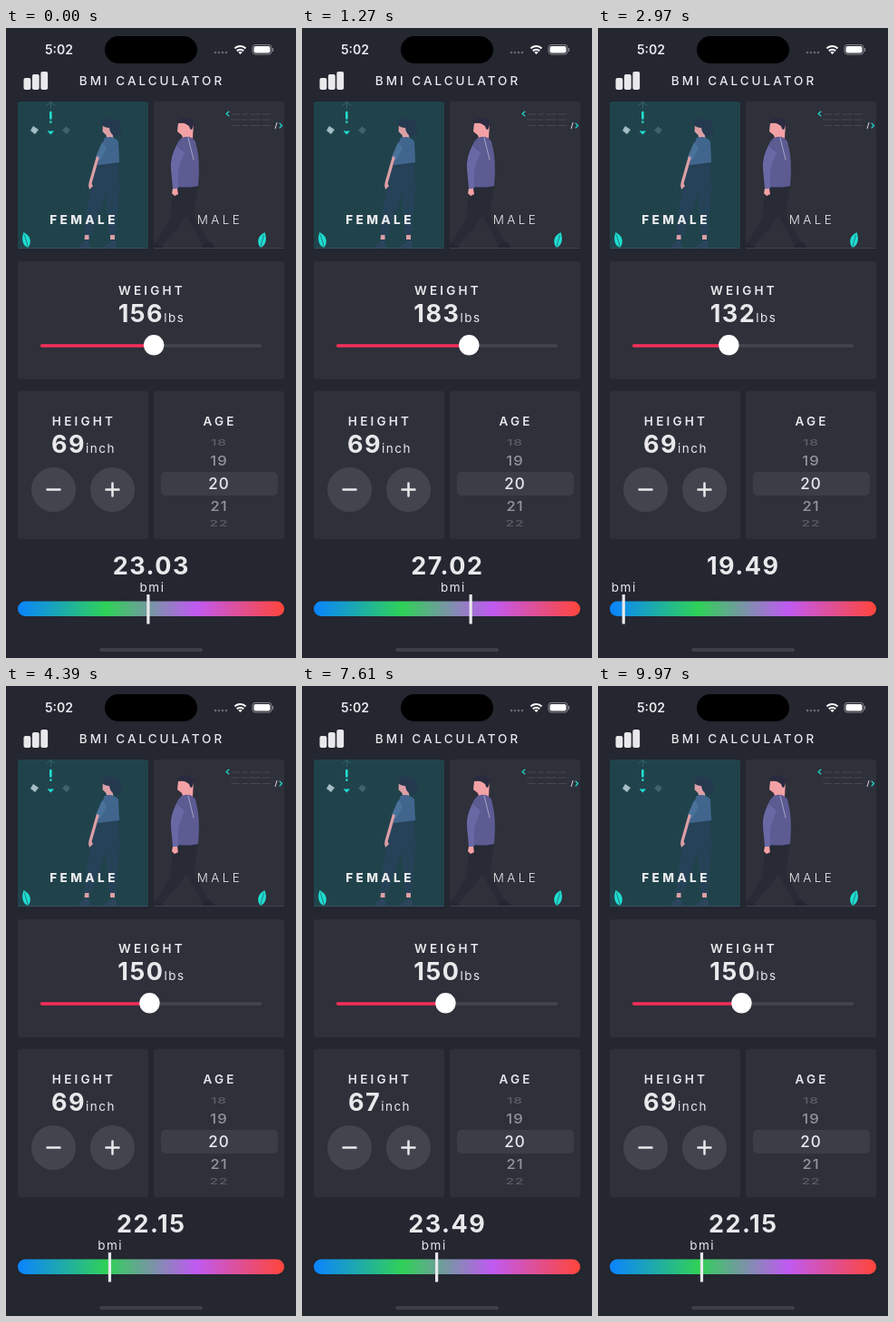
Recreate the animation shown at these times as an HTML page. Size 320 px wide and 694 px high, loop 10000 ms.

```html
<!DOCTYPE html>
<html lang="en">
<head>
<meta charset="utf-8">
<title>BMI Calculator</title>
<style>
  html, body { margin: 0; width: 100%; height: 100%; overflow: hidden; background: #242630; }
  svg { display: block; width: 320px; height: 694px; }
  text { font: 400 13.5px Inter, sans-serif; fill: #e9e9ec; text-anchor: middle; }
  .title { font-weight: 500; letter-spacing: 3px; }
  .head { font-weight: 600; letter-spacing: 3.2px; }
  .gender { letter-spacing: 3.4px; }
  .value { font-size: 27px; font-weight: 700; letter-spacing: 1.5px; }
  .unit { font-size: 13.5px; font-weight: 400; letter-spacing: 1.5px; }
  .age { font-size: 17px; font-weight: 500; letter-spacing: 1px; }
  .card { fill: #2e303a; }
  .line { fill: none; stroke-linecap: round; stroke-linejoin: round; }
</style>
</head>
<body>
<svg viewBox="0 0 320 694">
  <defs>
    <linearGradient id="scale">
      <stop stop-color="#0a84ff"/>
      <stop offset=".333" stop-color="#30d158"/>
      <stop offset=".667" stop-color="#bf5af2"/>
      <stop offset="1" stop-color="#ff453a"/>
    </linearGradient>
    <g id="leaf">
      <path d="M-3-9C5-5 6 2 2 8C-4 6-6-1-3-9Z" fill="#1fddd0"/>
      <path d="M-2-6L2 8" class="line" stroke="#20545c" stroke-width=".7"/>
    </g>
  </defs>
  <rect width="320" height="694" fill="#242630"/>

  <!-- Status bar -->
  <text x="58.500" y="28.500" style="font-size:14px;font-weight:600">5:02</text>
  <rect x="109" y="9" width="102" height="30" rx="15"/>
  <path d="M231 27h14" class="line" stroke="#686a72" stroke-width="2.600" stroke-dasharray="0 4"/>
  <g class="line" stroke="#fff" stroke-width="2" style="stroke-linecap:butt">
    <path d="M252.500 22.500a8.300 8.300 0 0 1 12 0M254.800 25.200a5.200 5.200 0 0 1 7.400 0"/>
  </g>
  <path d="M258.500 29l-2.200-2.300a3.200 3.200 0 0 1 4.400 0Z" fill="#fff"/>
  <rect x="272" y="18.500" width="21" height="10.500" rx="3" fill="none" stroke="#85868d"/>
  <rect x="273.500" y="20" width="18" height="7.500" rx="1.800" fill="#fff"/>
  <path d="M294.500 22v4" stroke="#85868d" stroke-width="1.200"/>

  <!-- Header -->
  <g fill="#e9e9ec">
    <rect x="19.500" y="55" width="7.800" height="13" rx="2"/>
    <rect x="28.900" y="51" width="7.800" height="17" rx="2"/>
    <rect x="38.300" y="48" width="7.800" height="20" rx="2"/>
  </g>
  <text x="161" y="63" class="title">BMI CALCULATOR</text>

  <!-- Female -->
  <rect x="13" y="81" width="144" height="162" rx="3" fill="#20434b"/>
  <path d="M13 242.500h144" stroke="#344f61"/>
  <path d="M49.500 81v7M45 85l4-3 5 3" class="line" stroke="#35636a"/>
  <path d="M49.300 93v6.500M49.300 103.500v.1" class="line" stroke="#1fddd0" stroke-width="2.600"/>
  <path d="M45.500 113.500h7.600l-3.800 4Z" fill="#1fddd0"/>
  <path d="M30 108l6 4-4 5-5-4Z" fill="#a4bcc4"/>
  <path d="M66 108.500l5 3.500-4 5-5-4Z" fill="#41616d"/>
  <path d="M107 105l-.5 9 4 4 1 5 7 1-1-12Z" fill="#dc9fa5"/>
  <path d="M106 107C105 99 122 96 126 105C129 112 127 118 124 119C118 120 115 116 114 110Q109 110 106 107Z" fill="#25394f"/>
  <path d="M100 148L124 147L125 178L121 228H114L110 183L94 228H86L90 195Z" fill="#264258"/>
  <path d="M109 121Q118 118 124 125L125 148L101 151L104 132Z" fill="#41668e"/>
  <path d="M106 126L99 142L104 146L111 132Z" fill="#4a739b"/>
  <path d="M101 143L97 157L93 171" class="line" stroke="#dc9fa5" stroke-width="3.200"/>
  <path d="M93 169l-2 4 1 5 4-4Z" fill="#dc9fa5"/>
  <path d="M87 228h4.500v5H86.500ZM115 228h5v5h-5Z" fill="#dc9fa5"/>
  <path d="M81 241Q84 235 91 233L93 242H80ZM109 241Q114 235 120 233L122 242H108Z" fill="#2c455c"/>
  <use href="#leaf" x="22.500" y="234"/>
  <text x="86" y="216" class="gender" style="font-weight:800">FEMALE</text>

  <!-- Male -->
  <rect x="163" y="81" width="144" height="162" rx="3" class="card"/>
  <path d="M163 242.500h144" stroke="#41424e"/>
  <path d="M246 92l-3 2.500 3 2.500M302 105l2.500 2.500-2.500 2.500" class="line" stroke="#1fddd0" stroke-width="1.100"/>
  <path d="M299 104l-2 7" stroke="#d5d5de"/>
  <path d="M249 95h44M248 101h46M249 107.500h43" stroke="#444651" stroke-dasharray="9 2 7 2 12 2"/>
  <path d="M185 173L212 173L207 205L225 239L218 241L199 207L190 220L171 241L164 238L181 211Z" fill="#282a36"/>
  <path d="M163 237l10 3v2h-12ZM216 239l9-4 6 7h-14Z" fill="#252632"/>
  <path d="M190 105L189 114L194 118L196 124L206 122L207 104Z" fill="#f2a2a5"/>
  <path d="M189 103Q193 98 202 99Q210 102 206 110Q204 115 202 108Q197 104 189 103Z" fill="#2a2a40"/>
  <path d="M194 121Q204 117 209 125Q215 145 212 174Q198 177 184 174L187 155L184 150Q185 128 194 121Z" fill="#5c5b92"/>
  <path d="M188 130Q181 142 182 155L184 177L190 177L190 156L197 137Z" fill="#6968a4"/>
  <path d="M201 121L207 145" class="line" stroke="#b8b7d4" stroke-width=".8"/>
  <path d="M184 177h5l1 6-4 2-3-3Z" fill="#f2a2a5"/>
  <use href="#leaf" transform="translate(282.500 234) scale(-1 1)"/>
  <text x="236" y="216" class="gender" style="font-weight:300">MALE</text>

  <!-- Weight -->
  <rect x="13" y="257" width="294" height="130" rx="3" class="card"/>
  <text x="161" y="294" class="head">WEIGHT</text>
  <text x="160.500" y="324" class="value"><tspan id="weight"></tspan><tspan class="unit">lbs</tspan></text>
  <path d="M39.500 350h241" class="line" stroke="#44464f" stroke-width="3.400"/>
  <path id="fill" class="line" stroke="#f42d57" stroke-width="3.400"/>
  <circle id="thumb" cy="349.300" r="11.200" fill="#fff"/>

  <!-- Height -->
  <rect x="13" y="400" width="144" height="163" rx="3" class="card"/>
  <text x="86" y="438" class="head">HEIGHT</text>
  <text x="85.500" y="467.500" class="value"><tspan id="height"></tspan><tspan class="unit">inch</tspan></text>
  <g fill="#43454e"><circle cx="52.500" cy="508.500" r="24.500"/><circle cx="117.500" cy="508.500" r="24.500"/></g>
  <path d="M45.500 508.500h14M110.500 508.500h14M117.500 501.500v14" class="line" stroke="#e9e9ec" stroke-width="2.500"/>

  <!-- Age -->
  <rect x="163" y="400" width="144" height="163" rx="3" class="card"/>
  <text x="236" y="438" class="head">AGE</text>
  <rect x="171" y="489" width="129" height="26" rx="5" fill="#3c3e47"/>
  <g id="ages"></g>

  <!-- Result -->
  <text id="bmi" x="160.300" y="602" class="value"></text>
  <text id="label" y="621" class="unit">bmi</text>
  <rect x="13" y="631.500" width="294" height="16.500" rx="8.250" fill="url(#scale)"/>
  <rect id="marker" y="624" width="3.200" height="32.500" fill="#e9e9ec"/>
  <rect x="103" y="683" width="114" height="4" rx="2" fill="#3d3f48"/>
</svg>
<script>
const LOOP = 10000;
const $ = id => document.getElementById(id);
const clamp = (v, lo, hi) => Math.min(hi, Math.max(lo, v));

// [time, weight]: the slider eases from one turning point to the next
const drags = [[-700, 165], [800, 145], [1600, 205.6], [2600, 131], [3050, 132], [3900, 150]];
// [time, change in height]: button taps
const taps = [[5200, 1], [5550, 1], [6040, -1], [6600, -1], [7000, -1], [7410, -1], [8000, 1], [8500, 1]];

function weightAt(t) {
  const i = drags.findIndex(([time]) => time > t);
  if (i < 0) return drags[drags.length - 1][1];
  const [t0, w0] = drags[i - 1], [t1, w1] = drags[i];
  const u = (t - t0) / (t1 - t0);
  return w0 + (w1 - w0) * u * u * (3 - 2 * u);
}
const heightAt = t => taps.reduce((h, [time, step]) => t >= time ? h + step : h, 69);
const bmiAt = t => Math.round(weightAt(t)) * 703 / heightAt(t) ** 2;
const scaleX = bmi => clamp(114.5 + (bmi - 22.15) * 31.5, 14.5, 305.5);

// Position that trails the value by averaging its recent past
function trail(t, span) {
  const steps = 24;
  let sum = 0;
  for (let i = 0; i < steps; i++) sum += scaleX(bmiAt(t - span * (i + .5) / steps));
  return sum / steps;
}

[[18, 457, .55, .25], [19, 477, .88, .55], [20, 502, 1, 1], [21, 526.5, .88, .55], [22, 546, .55, .25]]
  .forEach(([age, y, squash, opacity]) => {
    $('ages').innerHTML += `<text class="age" y="6.200" opacity="${opacity}"
      transform="translate(235 ${y}) scale(${.8 + squash / 5} ${squash})">${age}</text>`;
  });

function draw(now) {
  const t = now % LOOP;
  const weight = Math.round(weightAt(t));
  const x = 160 + (weight - 152) * .784;
  $('weight').textContent = weight;
  $('height').textContent = heightAt(t);
  $('bmi').textContent = bmiAt(t).toFixed(2);
  $('thumb').setAttribute('cx', x);
  $('fill').setAttribute('d', `M39.500 350H${x}`);
  $('marker').setAttribute('x', trail(t, 330) - 1.6);
  $('label').setAttribute('x', clamp(trail(t, 430), 28, 292) + .75);
  requestAnimationFrame(draw);
}
draw(0);
</script>
</body>
</html>
```
